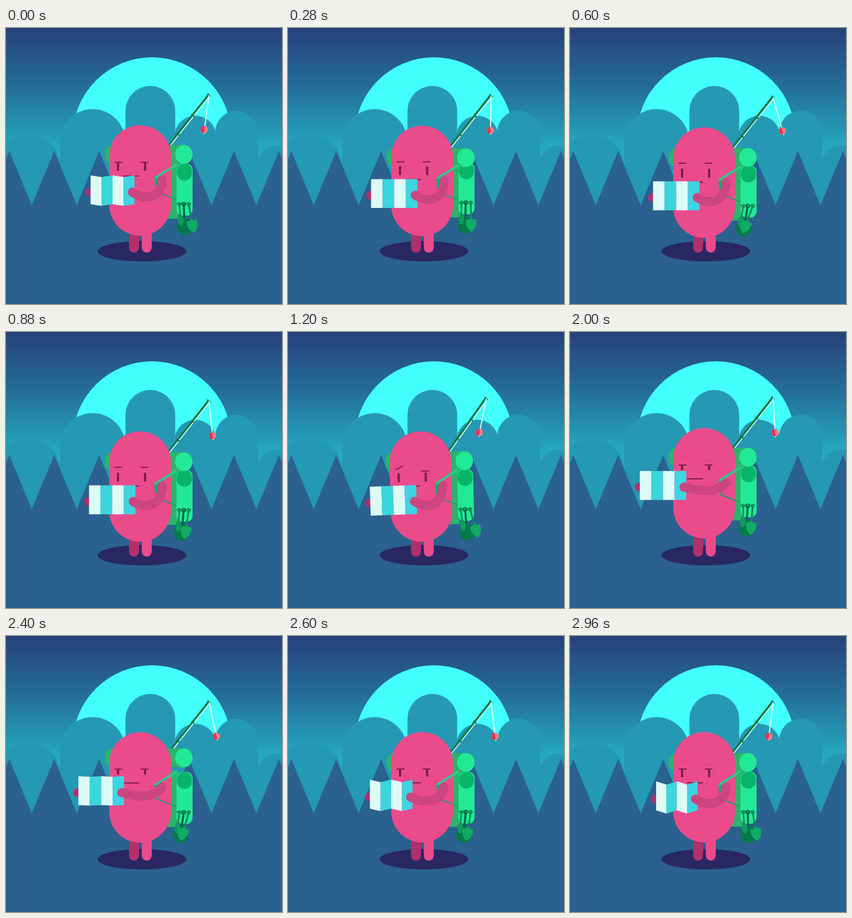
An HTML page for the animation above (3000 ms loop, 500x500 px).

```html
<!DOCTYPE html>
<html lang="en">
<head>
<meta charset="utf-8">
<title>Lost hiker</title>
<style>
  html, body { margin: 0; width: 100%; height: 100%; overflow: hidden; background: #2a618f; }
  svg { display: block; width: 100vw; height: 100vh; }
  .face { stroke: #7d1c45; fill: none; }
</style>
</head>
<body>
<svg viewBox="0 0 500 500">
  <defs>
    <linearGradient id="sky" x1="0" y1="0" x2="0" y2="230" gradientUnits="userSpaceOnUse">
      <stop offset="0" stop-color="#26427a"/>
      <stop offset=".45" stop-color="#256c98"/>
      <stop offset="1" stop-color="#25b0c2"/>
    </linearGradient>
  </defs>
  <rect width="500" height="330" fill="url(#sky)"/>
  <circle cx="264.5" cy="196.7" r="143.7" fill="#43fffb"/>
  <g id="hills" fill="#2598b4"></g>
  <path id="ground" fill="#2a618f"/>
  <ellipse cx="246.3" cy="404.5" rx="80.5" ry="18.5" fill="#292862"/>
  <g fill="none" stroke-width="18" stroke-linecap="round">
    <path d="M232 360V398" stroke="#b0306c"/>
    <path d="M255 360V398" stroke="#ea4b8b"/>
  </g>

  <g id="lean">
    <g id="rod" fill="none">
      <path d="M286 224L367 121" stroke="#0a7a4c" stroke-width="4"/>
      <path d="M288 225L369 123" stroke="#d8fbf0" stroke-width="1.8"/>
      <path d="M309 190l5 4M336 156l5 4M365 119l5 5" stroke="#0a7a4c" stroke-width="3"/>
      <g id="line">
        <path d="M0 0V71" stroke="#e2fbfb" stroke-width="2"/>
        <circle cy="63" r="6.5" fill="#ff7d88"/>
        <path d="M0 56.5a6.5 6.5 0 0 0 0 13z" fill="#f2304e"/>
      </g>
    </g>

    <g id="bag">
      <path d="M280 243H312V345.5H280z" fill="#2db36b"/>
      <rect x="309" y="246" width="29" height="94" rx="11" fill="#22e996"/>
      <rect x="309.5" y="246" width="27.5" height="30.5" rx="13.7" fill="#08b568"/>
      <path d="M308 318H335" stroke="#12a365" stroke-width="2"/>
      <g id="shovel">
        <path d="M0 0V30" stroke="#06663f" stroke-width="3.5"/>
        <ellipse cy="41" rx="14" ry="15" fill="#04794a"/>
      </g>
      <g id="spoon">
        <path d="M0 0V22" stroke="#0a8a53" stroke-width="2.5"/>
        <ellipse cy="29" rx="5" ry="10" fill="#0f9c5f"/>
      </g>
      <g id="spade">
        <path d="M0 0V32" stroke="#0a8a53" stroke-width="3"/>
        <path d="M-9 30Q-4 32 0 27Q4 32 9 30Q12 44 0 53Q-12 44-9 30z" fill="#10ab64"/>
      </g>
      <g fill="none" stroke="#0a8a53" stroke-width="1.6">
        <circle cx="314" cy="319" r="2.6"/>
        <circle cx="322" cy="319" r="3.3" stroke="#075f3d"/>
        <circle cx="331" cy="319" r="2.8"/>
      </g>
    </g>

    <g id="roll">
      <rect x="179" y="212" width="158" height="34" rx="14" fill="#2db36b"/>
      <ellipse cx="322.3" cy="229" rx="15.8" ry="17" fill="#22e996"/>
    </g>

    <g id="body">
      <rect x="187" y="176" width="112" height="200" rx="56" fill="#ea4b8b"/>
      <path d="M269 271L276 267V296L270 290z" fill="#08b068"/>
      <path d="M270 271.5L310 246.5" stroke="#25cf8a" stroke-width="4"/>
      <path d="M271 296L308 310.5" stroke="#12a365" stroke-width="2"/>
      <g class="face">
        <path id="brows" stroke-width="2"/>
        <path id="eyes" stroke-width="4"/>
        <path id="mouth" stroke-width="2"/>
      </g>
    </g>
  </g>

  <path id="farArm" fill="none" stroke="#b0306c" stroke-width="15.5" stroke-linecap="round"/>
  <g id="map"></g>
  <path id="arm" fill="none" stroke="#cc4581" stroke-width="16.5" stroke-linecap="round"/>
</svg>

<script>
const LOOP = 3000, TICK = 40;
const $ = id => document.getElementById(id);
const set = (id, name, value) => $(id).setAttribute(name, value);
const move = (id, value) => set(id, 'transform', value);

function add(parent, tag, attrs) {
  const el = document.createElementNS('http://www.w3.org/2000/svg', tag);
  for (const key in attrs) el.setAttribute(key, attrs[key]);
  $(parent).append(el);
  return el;
}

// Hills: centre, top, half width, cap height
[[40, 194, 58, 55], [157, 147, 59, 59], [261.5, 105, 45, 45],
 [343, 159, 38, 38], [418, 150, 39, 39], [490, 213, 35, 35]].forEach(([x, y, rx, ry]) =>
  add('hills', 'path', { d: `M${x - rx} 330V${y + ry}a${rx} ${ry} 0 0 1 ${2 * rx} 0V330z` }));

const STEP = 81.4;
let ridge = 'M-76 500V223';
for (let x = 6 - STEP; x < 580; x += STEP) ridge += `L${x} 223L${x + STEP / 2} 321`;
set('ground', 'd', ridge + 'V500z');

const panels = ['#dcfbf6', '#3ad6dc', '#dcfbf6', '#3fd4e2']
  .map(fill => add('map', 'path', { fill }));

const clamp = u => Math.min(1, Math.max(0, u));
const ramp = (t, from, to) => clamp((t - from) / (to - from));
const ease = (t, from, to) => { const u = ramp(t, from, to); return u * u * (3 - 2 * u); };

// Knee bends at the loop start and at 1700 ms, each a damped bounce
const spring = s => 26 * Math.exp(-s / 170) * Math.sin(2 * Math.PI * s / 300);
const hop = t => spring((t + 4 + LOOP) % LOOP) + spring((t - 1700 + LOOP) % LOOP);

// Turning points of the dangling bobber and tools: time, degrees
const turns = [[-660, -12.5], [100, 9], [580, -15.6], [1420, 17], [2340, -12.5], [3100, 9]];
function swingAt(t) {
  const i = turns.findIndex(([time]) => time > t);
  const [t0, a] = turns[i - 1], [t1, b] = turns[i];
  return a + (b - a) * ease(t, t0, t1);
}

function turn(x, y, deg) {
  const a = deg * Math.PI / 180, c = Math.cos(a), s = Math.sin(a);
  return [x * c - y * s, x * s + y * c];
}

function drawHiker(t, { sad, worry, plead, reach }, body, lean) {
  const bag = 4 * sad + hop(t - 40);
  const roll = 6 * sad + hop(t - 140) - 8 * Math.sin(Math.PI * ramp(t, 2100, 2600));
  const swing = swingAt(t), rodTilt = 1.6 * lean;

  move('lean', `rotate(${lean} 243 380)`);
  move('rod', `translate(0 ${body}) rotate(${rodTilt} 290 216)`);
  move('line', `translate(368 121.5) rotate(${swing - lean - rodTilt})`);
  move('body', `translate(0 ${body})`);
  move('bag', `translate(0 ${bag})`);
  move('roll', `translate(0 ${roll})`);
  move('spoon', `translate(314 319) rotate(${-swing * .6})`);
  move('shovel', `translate(322 319) rotate(${-swing * .5 + 2})`);
  move('spade', `translate(331 319) rotate(${-swing * 1.3})`);

  const brow = 243 - 2 * sad, right = brow + 7 * worry;
  set('brows', 'd', `M197 ${brow + 4 * worry}L211 ${brow - 3 * worry}` +
    `M244 ${right - 10 * plead}L258 ${right - 4 * plead}`);
  const top = 243 + 8 * sad, end = 258 + 9 * sad - 6 * reach;
  set('eyes', 'd', `M203 ${top}V${end}M252 ${top}V${end}`);
  set('mouth', 'd', `M212 ${268 + 7 * sad}H241`);
}

function drawMap(x, y, tilt, fold, width) {
  move('map', `translate(${x} ${y}) rotate(${tilt})`);
  const w = width / 4, h = 26.2;
  panels.forEach((panel, i) => {
    const left = (i - 2) * w, a = fold * (i % 2 - .5);
    panel.setAttribute('d', `M${left} ${a - h}L${left + w} ${-a - h}V${h - a}L${left} ${a + h}z`);
  });
}

function drawArms(x, y, tilt, scale, body, lean) {
  const grip = side => {
    const [dx, dy] = turn(side * scale, 3 - .12 * tilt, tilt);
    return [x + dx, y + dy];
  };
  const [fx, fy] = grip(-43.5);
  set('farArm', 'd', `M${fx} ${fy}L${x} ${y}`);

  const [hx, hy] = grip(38);
  const [dx, dy] = turn(40, body - 105, lean);
  const sx = 243 + dx, sy = 380 + dy, stretch = clamp((230 - hx) / 25);
  set('arm', 'd', `M${sx} ${sy}C${sx - 24 * stretch} ${sy + 30 - 8 * stretch} ` +
    `${hx + 28 - 2 * stretch} ${hy + 18 - 13 * stretch - .4 * tilt} ${hx} ${hy}`);
}

function draw(t) {
  const mood = {
    sad: ease(t, 0, 400) - ease(t, 1700, 1860),
    worry: ease(t, 850, 1100) - ease(t, 1700, 1880),
    plead: ease(t, 1240, 1440) - ease(t, 1700, 1880),
    reach: ease(t, 1800, 1980) - ease(t, 2280, 2760)
  };
  const { sad, worry, plead, reach } = mood;
  const folded = ease(t, 2280, 2760) + 1 - ease(t, -60, 60);

  const body = 6 * sad - 2 + hop(t), lean = -1.2 * worry;
  const mapX = 192.5 - 1.5 * worry - 24 * reach + folded;
  const mapY = 292.5 + 11.5 * sad + worry - 6 * plead - 14.5 * reach + hop(t);
  const tilt = 35.5 * plead - 2 * worry;
  const width = 84 - 9 * folded;

  drawHiker(t, mood, body, lean);
  drawMap(mapX, mapY, tilt, 6 * folded, width);
  drawArms(mapX, mapY, tilt, width / 84, body, lean);
}

const start = performance.now();
function frame() {
  const t = (performance.now() - start) % LOOP;
  draw(Math.floor(t / TICK) * TICK);
  requestAnimationFrame(frame);
}
frame();
</script>
</body>
</html>
```
